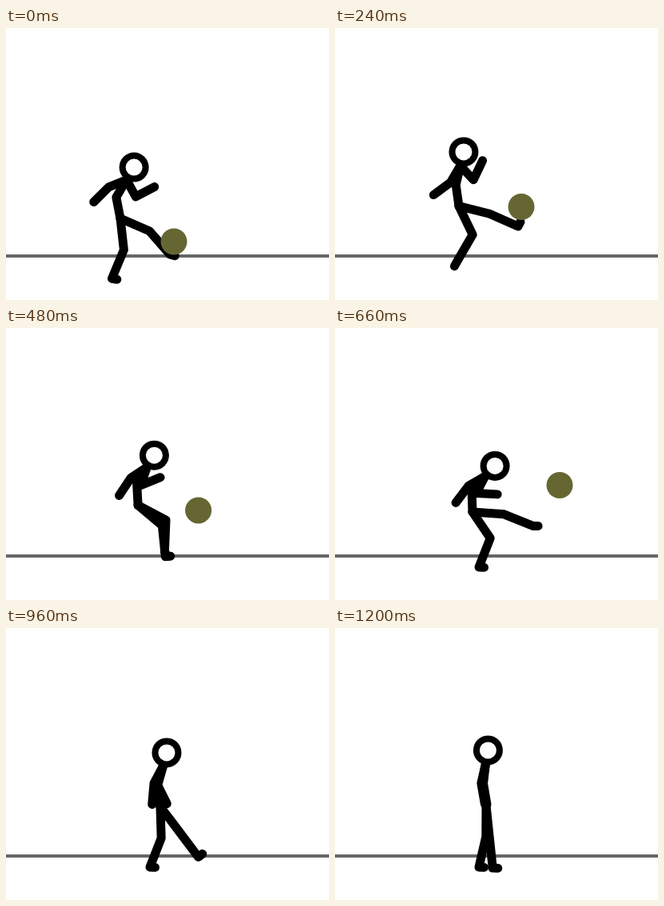
These frames come from a looping animation (404x340 px, 1260 ms). An HTML page with a canvas:

```html
<!DOCTYPE html>
<html lang="en">
<head>
<meta charset="utf-8">
<title>Kick</title>
<style>
html, body { margin: 0; width: 100%; height: 100%; overflow: hidden; background: #fff; }
canvas { display: block; }
</style>
</head>
<body>
<canvas id="stage" width="404" height="340"></canvas>
<script>
const ctx = document.getElementById('stage').getContext('2d');
const STEP = 60, STEPS = 21;
const WAIST = 27, ARM = [24, 26.5], LEG = [39.5, 39], FOOT = 6.5;

// Eases through [step, value] keys: rests at turning points, never overshoots
function track(...keys) {
  const slope = k => (keys[k + 1][1] - keys[k][1]) / (keys[k + 1][0] - keys[k][0]);
  const tangents = keys.map((_, k) => {
    if (k === 0 || k === keys.length - 1) return 0;
    const a = slope(k - 1), b = slope(k);
    return a * b > 0 ? 2 * a * b / (a + b) : 0;
  });
  return t => {
    const i = keys.findIndex(key => key[0] > t) - 1;
    if (i < 0) return keys[keys.length - 1][1];
    const [start, from] = keys[i], [end, to] = keys[i + 1];
    const span = end - start, u = (t - start) / span, v = 1 - u;
    return v * v * (1 + 2 * u) * from + u * u * (3 - 2 * u) * to
      + span * u * v * (v * tangents[i] - u * tangents[i + 1]);
  };
}

const hipX = track([0, 143], [4, 155], [11, 172], [14, 178], [16, 193], [20, 189]);
const hipY = track([0, 238], [4, 222.7], [7, 220], [11, 230], [18, 221.5]);
const lean = track([0, 15], [4, 5], [8, 18], [11, 26], [18, 2]);

const backSwing = track([0, 146], [5, 131], [11, 138], [19, 91]);
const frontSwing = track([0, 14], [4, -13], [8, 37], [11, 56], [18, 88]);
const frontReach = track([0, 36], [8, 21], [18, 50]);

const kickSwing = track([0, 98], [4, 92], [8, 60], [11, 13], [14, 20], [16, 53], [20, 84]);
const kickReach = track([0, 76], [7, 65], [12, 79]);
const kickToe = track([0, 9], [4, 119], [11, 0], [14, -51], [20, 2]);

// This foot lifts the ball, then stays planted
const plantX = track([0, 205], [4, 229], [11, 180]);
const plantY = track([0, 283], [4, 248], [10, 299]);
const plantToe = track([0, 16], [4, -63], [9, 2]);

function polar([x, y], length, degrees) {
  const a = degrees * Math.PI / 180;
  return [x + length * Math.cos(a), y + length * Math.sin(a)];
}

// Elbow or knee between two ends; the sign of bend picks the side
function joint([ax, ay], [bx, by], [upper, lower], bend) {
  const dx = bx - ax, dy = by - ay, d = Math.hypot(dx, dy);
  const along = (upper * upper - lower * lower + d * d) / (2 * d);
  const out = bend * Math.sqrt(Math.max(0, upper * upper - along * along));
  return [ax + (dx * along - dy * out) / d, ay + (dy * along + dx * out) / d];
}

function line(...points) {
  ctx.beginPath();
  points.forEach(p => ctx.lineTo(...p));
  ctx.stroke();
}

function disc([x, y], r, color) {
  ctx.fillStyle = color;
  ctx.beginPath();
  ctx.arc(x, y, r, 0, 2 * Math.PI);
  ctx.fill();
}

function drawArm(neck, hand, bend) {
  line(neck, joint(neck, hand, ARM, bend), hand);
}

function drawLeg(hip, ankle, toe) {
  line(hip, joint(hip, ankle, LEG, -1), ankle, polar(ankle, FOOT, toe));
}

function drawFigure(t) {
  const hip = [hipX(t), hipY(t)], tilt = lean(t);
  const waist = polar(hip, WAIST, -96.5 - 4.5 * Math.cos(2 * Math.PI * t / STEPS));
  const head = polar(hip, 69 - 0.19 * tilt, tilt - 90);
  const neck = waist.map((w, i) => w + 0.58 * (head[i] - w));

  ctx.strokeStyle = '#000';
  ctx.lineWidth = 11;
  ctx.lineCap = ctx.lineJoin = 'round';
  line(hip, waist, neck);
  drawArm(neck, polar(neck, 49.5, backSwing(t)), t < 8 ? Math.cos(t * Math.PI / 4) : 1);
  drawArm(neck, polar(neck, frontReach(t), frontSwing(t)), 1);
  drawLeg(hip, polar(hip, kickReach(t), kickSwing(t)), kickToe(t));
  drawLeg(hip, [plantX(t), plantY(t)], plantToe(t));
  disc(head, 18.5, '#000');
  disc(head, 10.5, '#fff');
}

// Carried on the foot, tossed up, then kicked away
function ballAt(t) {
  if (t < 4) return [plantX(t) + 5, plantY(t) - 16 - 2 * t];
  if (t > 10) return [281 + 47 * (t - 11), 196.5 - 58 * (t - 11)];
  const s = t - 4;
  return [233 + 1.9 * s, 223.5 - 10.9 * s + 3 * s * s];
}

function draw(t) {
  ctx.fillStyle = '#fff';
  ctx.fillRect(0, 0, 404, 340);
  ctx.fillStyle = '#666';
  ctx.fillRect(0, 283, 404, 4);
  drawFigure(t);
  disc(ballAt(t), 16.5, '#663');
}

const begin = performance.now();
function tick() {
  draw(Math.floor((performance.now() - begin) / STEP) % STEPS);
  requestAnimationFrame(tick);
}
tick();
</script>
</body>
</html>
```
